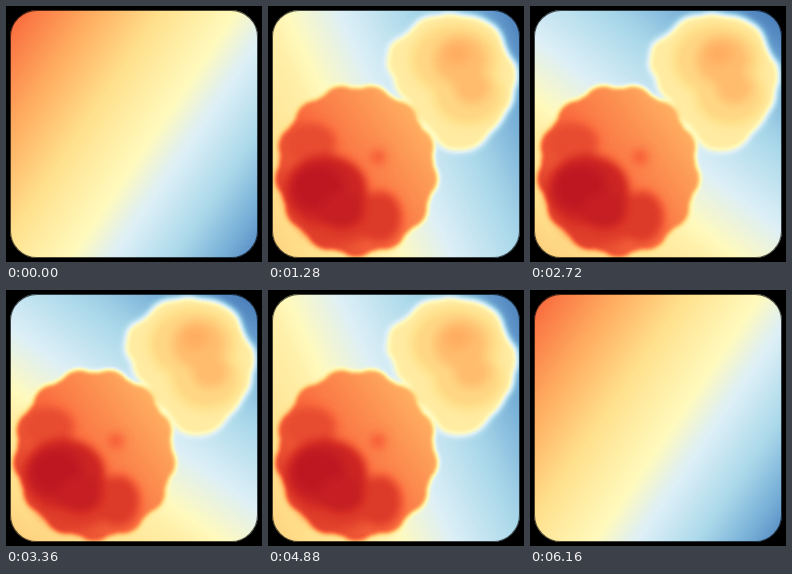
Write an HTML page that moves like this. It is 256 px wide and 256 px high and loops after 6240 ms.

```html
<!DOCTYPE html>
<html lang="en">
<head>
<meta charset="utf-8">
<title>Heat map</title>
<style>
  html, body { margin: 0; width: 100%; height: 100%; overflow: hidden; background: #000; }
  svg { display: block; width: 100vw; height: 100vh; }
</style>
</head>
<body>
<svg viewBox="0 0 256 256">
  <defs>
    <!-- Grey levels become a red-yellow-blue scale -->
    <filter id="heat" filterUnits="userSpaceOnUse" x="0" y="0" width="256" height="256" color-interpolation-filters="sRGB">
      <feComponentTransfer>
        <feFuncR type="table" tableValues=".65 .84 .98 1 1 1 .87 .67 .46 .27 .19"/>
        <feFuncG type="table" tableValues="0 .18 .42 .68 .88 .98 .94 .85 .68 .47 .21"/>
        <feFuncB type="table" tableValues=".13 .14 .24 .38 .55 .74 .97 .92 .84 .72 .58"/>
      </feComponentTransfer>
    </filter>
    <filter id="edge" x="-20%" y="-20%" width="140%" height="140%" color-interpolation-filters="sRGB">
      <feGaussianBlur stdDeviation="2"/>
    </filter>
    <filter id="haze" x="-20%" y="-20%" width="140%" height="140%" color-interpolation-filters="sRGB">
      <feGaussianBlur stdDeviation="3"/>
    </filter>
    <filter id="soft" x="-50%" y="-50%" width="200%" height="200%" color-interpolation-filters="sRGB">
      <feGaussianBlur stdDeviation="5"/>
    </filter>
    <filter id="rim"><feGaussianBlur stdDeviation=".7"/></filter>
    <clipPath id="card"><rect x="4" y="4" width="248" height="248" rx="27"/></clipPath>
    <linearGradient id="plane" gradientUnits="userSpaceOnUse" x1="-44" y1="128" x2="300" y2="128"></linearGradient>
    <linearGradient id="body" gradientUnits="userSpaceOnUse" x1="30" y1="205" x2="160" y2="115"></linearGradient>
  </defs>
  <g clip-path="url(#card)">
    <g filter="url(#heat)">
      <rect width="256" height="256" fill="url(#plane)"/>
      <g id="blobs">
        <g id="small" filter="url(#haze)"></g>
        <g id="smallCore" filter="url(#soft)"></g>
        <g id="big" fill="url(#body)" filter="url(#edge)"></g>
        <g id="bigCore" filter="url(#soft)"></g>
      </g>
    </g>
    <rect x="4" y="4" width="248" height="248" rx="27" fill="none" stroke="#000" stroke-opacity=".7" stroke-width="2" filter="url(#rim)"/>
  </g>
</svg>
<script>
const STEP = 80, COUNT = 39, CUT = 13;
const $ = id => document.getElementById(id);
const grey = v => `rgb(${[v, v, v].map(c => Math.round(c * 255))})`;

function add(parent, tag, attrs) {
  const el = document.createElementNS('http://www.w3.org/2000/svg', tag);
  for (const k in attrs) el.setAttribute(k, attrs[k]);
  return $(parent).appendChild(el);
}

function setStops(id, stops) {
  $(id).replaceChildren();
  for (const [offset, v] of stops) add(id, 'stop', { offset, 'stop-color': grey(v) });
}

function spot(parent, cx, cy, rx, ry, v) {
  add(parent, 'ellipse', { cx, cy, rx, ry, fill: grey(v) });
}

// Scalloped body
setStops('body', [[0, .14], [.35, .2], [.7, .26], [1, .31]]);
add('big', 'ellipse', { cx: 88.5, cy: 164.5, rx: 78, ry: 83 });
for (let i = 0; i < 13; i++) {
  const a = (i + .25) / 13 * 2 * Math.PI;
  add('big', 'circle', { cx: 88.5 + 61 * Math.cos(a), cy: 164.5 + 66 * Math.sin(a), r: 21 });
}
spot('bigCore', 42, 137, 26, 20, .15);
spot('bigCore', 70, 212, 40, 27, .125);
spot('bigCore', 112, 211, 22, 26, .12);
spot('bigCore', 58, 184, 41, 35, .08);
spot('bigCore', 50, 182, 26, 23, .05);
spot('bigCore', 74, 205, 22, 18, .065);
spot('bigCore', 110, 151, 8, 8, .18);

// Lumpy body
add('small', 'path', {
  d: 'M120 50Q120 36 132 32Q142 26 147 18Q155 9 170 9Q182 4 194 9Q210 9 220 16' +
     'Q233 22 236 38Q240 50 248 58Q252 74 246 84Q246 99 238 106Q232 120 222 127' +
     'Q212 144 196 145Q178 147 170 137Q164 126 156 119Q142 110 142 97Q126 88 126 72' +
     'Q116 62 120 50Z',
  fill: grey(.445)
});
spot('smallCore', 187, 54, 44, 36, .38);
spot('smallCore', 200, 88, 35, 31, .38);
spot('smallCore', 192, 54, 26, 24, .33);
spot('smallCore', 204, 82, 18, 16, .33);
spot('smallCore', 189, 48, 13, 11, .3);

const BARE = [[0, .19], [.22, .31], [.4, .42], [.55, .5], [.63, .585], [.8, .7], [1, .87]];
const SHARED = [[0, .36], [.3, .46], [.5, .6], [.72, .72], [1, .9]];

// [step, tilt in degrees]
const TILT = [[0, 34], [12, -44], [13, -22], [16, -25], [23, -33], [28, -40], [38, -60]];

function tiltAt(n) {
  const i = Math.max(1, TILT.findIndex(([k]) => k >= n));
  const [k0, a0] = TILT[i - 1], [k1, a1] = TILT[i];
  return a0 + (a1 - a0) * (n - k0) / (k1 - k0);
}

let last = -1;
function draw(now) {
  const k = Math.floor(now / STEP) % (2 * COUNT);
  const n = Math.min(k, 2 * COUNT - 1 - k);
  if (n !== last) {
    last = n;
    setStops('plane', n < CUT ? BARE : SHARED);
    $('plane').setAttribute('gradientTransform', `rotate(${tiltAt(n)} 128 128)`);
    $('blobs').style.display = n < CUT ? 'none' : '';
  }
  requestAnimationFrame(draw);
}
draw(performance.now());
</script>
</body>
</html>
```
